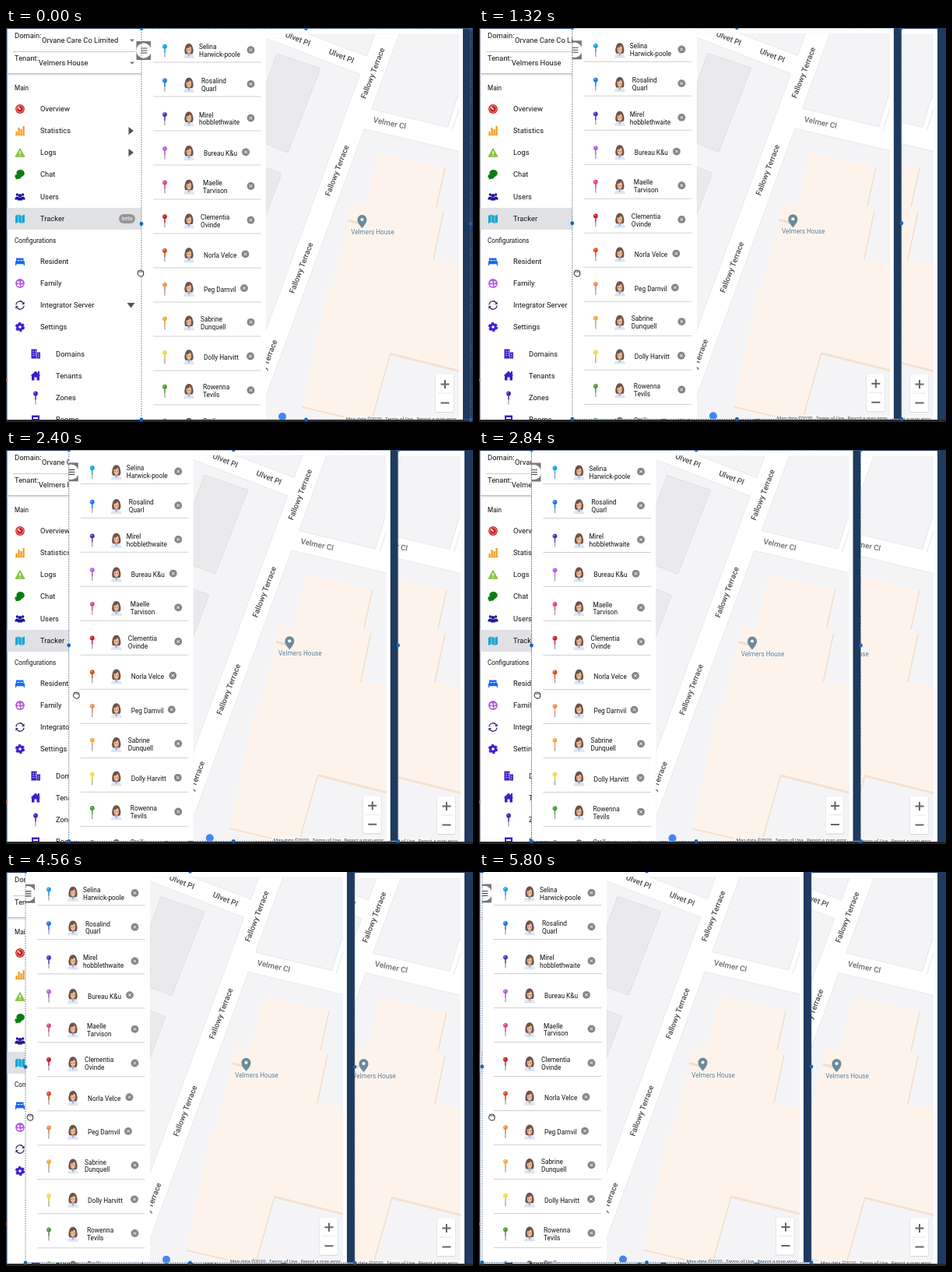
Recreate the animation shown at these times as an HTML page. Size 600x506 px, loop 5.84 s.

```html
<!DOCTYPE html>
<html lang="en">
<head>
<meta charset="utf-8">
<title>Sliding panel</title>
<style>
  html, body { margin: 0; width: 100%; height: 100%; overflow: hidden; background: #1f3a5f; }
  svg { display: block; width: 100vw; height: 100vh; font-family: Roboto, Arial, sans-serif; }
  .menu { font-size: 9.4px; fill: #111; }
  .head { font-size: 8.2px; fill: #111; }
  .row { font-size: 8.3px; fill: #111; }
  .road { font-size: 9.9px; font-weight: 500; fill: #4c4c4c; text-anchor: middle; }
</style>
</head>
<body>
<svg id="stage" viewBox="0 0 600 506" preserveAspectRatio="none"></svg>
<script>
const LOOP = 5840, STEP = 40, PANEL_X = 174, PANEL_W = 423;

// time, panel x, panel y shift, cursor x
const KEYS = [
  [0, 174, 0, 173], [800, 142, -.5, 142], [1840, 97.7, -1, 110], [2840, 67.5, -.5, 75],
  [3760, 52, -.3, 51], [4560, 25, -1.2, 31], [5800, 4, -1.5, 16.5]
];

const text = (x, y, s, cls, extra = '') => `<text x="${x}" y="${y}" class="${cls}" ${extra}>${s}</text>`;
const rect = (x, y, w, h, fill, extra = '') =>
  `<rect x="${x}" y="${y}" width="${w}" height="${h}" fill="${fill}" ${extra}/>`;
const circle = (x, y, r, fill, extra = '') => `<circle cx="${x}" cy="${y}" r="${r}" fill="${fill}" ${extra}/>`;
const path = (d, fill, extra = '') => `<path d="${d}" fill="${fill}" ${extra}/>`;
const line = (d, color, w = 1, extra = '') =>
  path(d, 'none', `stroke="${color}" stroke-width="${w}" ${extra}`);
const at = (x, y, body, turn = 0) => `<g transform="translate(${x} ${y}) rotate(${turn})">${body}</g>`;

const pin = color =>
  line('M0 -3V9', '#9a949f', 1.2) + line('M0 -3V3', color, 1.2) +
  circle(0, -5, 2.9, color) + circle(-.9, -5.9, .9, '#fff', 'opacity=".55"');

const icons = {
  gauge: circle(0, 0, 5.9, '#c8201e') + circle(0, 0, 4.3, 'none', 'stroke="#fff" stroke-width=".6"') +
    line('M-2.6 -2.4L.6 .8', '#fff', 1.5),
  bars: [[-5.5, 4], [-2.5, 9], [.5, 7], [3.5, 11]].map(([x, h]) => rect(x, 5 - h, 2.2, h, '#f39a1c')).join('') +
    rect(-6, 5, 12, 1, '#f39a1c'),
  warn: path('M0 -5.5L6 5.3H-6Z', '#8bc34a', 'stroke="#8bc34a" stroke-linejoin="round"') +
    line('M0 -2V2M0 3V4.2', '#fff', 1.3),
  chat: path('M1 -6A5 4.6 0 1 1 -2 2.4L-5 4L-4 1A5 4.6 0 0 1 1 -6Z', '#0a7d12') +
    path('M-5.5 0Q-8 3-5 5L-6 6.4L-2.5 5.8Q1 6 2 3.5Z', '#0a7d12'),
  users: [[-3.6, -1.6], [3.6, -1.6], [0, -.4]].map(([x, y], i) =>
    circle(x, y - 1.4, i > 1 ? 2.2 : 1.7, '#1d1596') +
    path(`M${x - 3} ${y + 5}Q${x - 3} ${y + 1} ${x} ${y + 1}T${x + 3} ${y + 5}Z`, '#1d1596')).join(''),
  map: path('M-6 -4L-2.4 -5.5V4.5L-6 6Z M-1.7 -5.5L1.7 -4V6L-1.7 4.5Z M2.4 -4L6 -5.5V4.5L2.4 6Z', '#12a5d8'),
  bed: path('M-5 -4.5H4.500V-.5H6V5H4.800V3.300H-4.800V5H-6V-.5H-5Z', '#1769f0') +
    line('M-3.500 -1.500H-.6M.6 -1.500H3.200', '#fff', 1),
  family: circle(0, 0, 5.9, '#b65be0') + circle(-2, -1.6, 1.5, '#fff') + circle(2.2, -1.6, 1.2, '#fff') +
    path('M-4.3 2.4Q-2 -.8 .3 2.4L-.6 4.4Z M1.2 2.6Q2.5 -.4 4.3 2L1.6 4Z', '#fff'),
  sync: line('M-5 -.5A5 5 0 0 1 4 -3.2M5 .5A5 5 0 0 1 -4 3.2', '#3a2566', 1.3) +
    path('M5.6 -4.8V-1H2Z M-5.6 4.8V1H-2Z', '#3a2566'),
  gear: circle(0, 0, 4.8, '#3a1fd6', 'stroke="#3a1fd6" stroke-width="2.6" stroke-dasharray="2.9 2.13"') +
    circle(0, 0, 1.8, '#fff'),
  building: rect(-5.5, -6, 7, 12, '#3a1fc8') + rect(2, -2, 4, 8, '#3a1fc8') +
    line('M-3 -4V4M0 -4V4M4 0V5', '#fff', 1, 'stroke-dasharray="1.4 1.3"'),
  house: path('M0 -6L6.5 0H5V6H1.5V2H-1.5V6H-5V0H-6.5Z M3 -5.5H5V-2H3Z', '#3a1fc8'),
  zone: pin('#3a1fc8'),
  room: rect(-5, -5, 10, 9, '#3a1fc8') + rect(-3, -2.5, 6, 2, '#fff')
};

const MENU = [
  [104, 'gauge', 'Overview'], [132, 'bars', 'Statistics'], [160, 'warn', 'Logs'], [188, 'chat', 'Chat'],
  [217, 'users', 'Users'], [245, 'map', 'Tracker'], [300, 'bed', 'Resident'], [328, 'family', 'Family'],
  [356, 'sync', 'Integrator Server'], [384, 'gear', 'Settings'],
  [418.5, 'building', 'Domains', 20], [446.5, 'house', 'Tenants', 20],
  [474.5, 'zone', 'Zones', 20], [502.5, 'room', 'Rooms', 20]
];

function menu() {
  const caret = (x, y) => path(`M${x - 3} ${y - 1.5}h6l-3 3.2Z`, '#777');
  const more = y => path(`M157.5 ${y - 5}l6.5 5l-6.5 5Z`, '#555');
  return rect(1.5, 1, 173, 502, '#fff') +
    text(11, 12.5, 'Domain:', 'menu') + text(46, 19, 'Orvane Care Co Limited', 'menu') +
    text(11, 41.5, 'Tenant:', 'menu') + text(42, 48, 'Velmers House', 'menu') +
    caret(162, 16) + caret(162, 45) +
    line('M9 30.5H166', '#ccc') + line('M1.5 58.8H174', '#bdbdbd', 1.4) + line('M1.5 60H174', '#e6e6e6', 1.4) +
    text(11, 80, 'Main', 'head') + text(11, 275.5, 'Configurations', 'head') +
    rect(1.5, 231, 173, 28, '#e0e1e4') +
    MENU.map(([y, icon, label, indent = 0]) =>
      at(18 + indent, y, icons[icon]) + text(44 + indent, y + 3.4, label, 'menu')).join('') +
    more(132) + more(160) + path('M155.5 353h10l-5 6.5Z', '#555') +
    rect(145, 239, 21, 12, '#969696', 'rx="6"') +
    text(155.5, 247.3, 'beta', '', 'font-size="6.8" fill="#fff" text-anchor="middle"');
}

// pin colour, text x, close x, lines
const PEOPLE = [
  ['#1ba0ea', 248, 314.5, 'Selina', 'Harwick-poole'], ['#1976f0', 251, 314.5, 'Rosalind', 'Quarl'],
  ['#4a2fc0', 248, 314.5, 'Mirel', 'hobblethwaite'], ['#b85ce0', 254, 308, 'Bureau K&amp;u'],
  ['#e0457b', 253, 314.5, 'Maelle', 'Tarvison'], ['#c81e1e', 250, 314.5, 'Clementia', 'Ovinde'],
  ['#e0491e', 254, 307.5, 'Norla Velce'], ['#f08c50', 254, 306, 'Peg Darnvil'],
  ['#f5a742', 250, 314.5, 'Sabrine', 'Dunquell'], ['#f5d94a', 254, 314, 'Dolly Harvitt'],
  ['#4d9a3a', 253, 314.5, 'Rowenna', 'Tevils'], ['#4d9a3a', 253, 314.5, 'Ottilie', 'Brandox']
];

const avatar =
  path('M-4.500 4.500Q-6.500 1-5 -3.500Q-4 -9 0 -9T5 -3.500Q6.500 1 4.500 4.500Z', '#705348') +
  path('M-7 10Q-7 4.500 0 4.500T7 10Z', '#dfe5ef') +
  path('M-2 4.300H2L0 8.500Z', '#8fb0d8') +
  path('M-3.200 -3Q0 -3 1.500 -5.500Q3.200 -4.500 3.200 -1Q3.200 3 0 4Q-3.200 3 -3.200 -1Z', '#edb995') +
  circle(-1.4, -.8, .5, '#4b332b') + circle(1.4, -.8, .5, '#4b332b');

function person([color, x, closeX, first, second], i) {
  const y = 28.7 + 43.7 * i;
  const label = second ? text(x, y - 1.5, first, 'row') + text(x, y + 8.3, second, 'row')
                       : text(x, y + 4, first, 'row');
  return at(204, y, pin(color)) + at(235, y + .3, avatar) + label +
    at(closeX, y - .5, circle(0, 0, 4.9, '#85858b') + line('M-1.7 -1.7L1.7 1.7M1.7 -1.7L-1.7 1.7', '#fff', 1)) +
    line(`M189 ${44 + 44 * i}H327.500`, '#cfcfcf');
}

function map() {
  const roads = [['M324 -4L470 52', 24], ['M500.500 -22L308 501', 28.5], ['M455 114.500L600 149', 26]];
  const railway = [[471, 58], [425, 183], [379, 308], [333, 433]];
  return `<g clip-path="url(#mapClip)">` + rect(334, 7, 249, 496, '#f4f4f6') +
    path('M348 33L404 52L362 160L334 149V72Z M334 179L354 187L334 240Z', '#eaeaec', 'stroke="#dfdfe1"') +
    path('M479 161L564 180L553 230L562 236L549 298L590 306V510H440L381 487L413 333L418 335L440 248L445 224L462 231Z', '#fdf3ea') +
    path('M494 418L590 442V510H469Z', '#f4f4f6') +
    line('M564 180L553 230M562 236L549 298M381 487L445 502M494 418L470 503', '#efdcc9', 1.4) +
    line('M440 247L455 251', '#f3dcc6', 3) + line('M494 418.500L590 442.500', '#f3e0cf', 3) +
    roads.map(([d, w]) => line(d, '#e4e5e8', w + 1.6)).join('') +
    path('M566 133L580 88H596V150Z', '#fff', 'stroke="#e4e5e8"') +
    roads.map(([d, w]) => line(d, '#fff', w)).join('') +
    line('M573 132L584 98', '#e4e5e8') +
    railway.map(([x, y]) => at(x, y, text(0, 3.5, 'Fallowy Terrace', 'road'), -69)).join('') +
    [[375, 14], [431, 36]].map(([x, y]) => at(x, y, text(0, 3.5, 'Ulvet Pl', 'road'), 22)).join('') +
    at(493, 122, text(0, 3.5, 'Velmer Cl', 'road', 'style="fill:#6c6c6c"'), 12) +
    path('M457.500 257Q451 250 451.500 246A6 6 0 0 1 463.500 246Q464 250 457.500 257Z', '#6a8a9d') +
    circle(457.5, 246, 2.1, '#fff') +
    text(471, 265, 'Velmers House', '', 'font-size="8.2" fill="#5d7386" text-anchor="middle" paint-order="stroke" stroke="#fff" stroke-width="1.5"') +
    rect(434, 498, 150, 6, '#f8f8f8', 'opacity=".8"') +
    text(437, 503.5, 'Map data ©2020 &#160; Terms of Use &#160; Report a map error', '', 'font-size="6.1" fill="#444"') +
    circle(355, 499, 5, '#4285f4') +
    rect(551.5, 445, 24, 49, '#d5d5d5', 'rx="2"') + rect(552, 445, 23, 48, '#fff', 'rx="1.500"') +
    line('M555 469H572', '#e6e6e6') +
    line('M558.500 457.500H569.500M564 452V463M558.500 481.500H569.500', '#666', 2) + '</g>';
}

const burger = rect(167.5, 17, 18.5, 24, '#777') + circle(177, 29, 9.7, '#fff') +
  line('M173.500 26H181.500M173.500 29H181.500M173.500 32H181.500', '#444', 1.2);

const handles = [[0, .5], [.5, .5], [1, .5], [0, 251.5], [1, 251.5], [0, 503], [.5, 503], [1, 503]]
  .map(([k, y]) => circle(PANEL_X + k * PANEL_W, y, 2.4, '#1766b8')).join('');
const frame = `M${PANEL_X} .5H${PANEL_X + PANEL_W}V503H${PANEL_X}Z`;

const stage = document.getElementById('stage');
stage.innerHTML = `<defs>
  <clipPath id="mapClip"><rect x="334" y="7.500" width="248" height="495.500"/></clipPath>
  <clipPath id="panelClip"><rect x="${PANEL_X}" y="0" width="${PANEL_W}" height="503"/></clipPath>
  <g id="page">${rect(174, 1, 413, 502, '#fff') + PEOPLE.map(person).join('') + map() + burger}</g>
  </defs>` +
  rect(0, 0, 600, 506, '#1f3a5f') +
  `<use href="#page" x="2"/>` + menu() + burger +
  rect(0, 503, 600, 3, '#242628') + rect(0, 450, 1.5, 4, '#b5673c') +
  `<g id="panel"><g clip-path="url(#panelClip)">${rect(174, 0, 423, 503, '#1f3a5f')}<use href="#page"/></g>` +
  line(frame, '#66788c', 1, 'stroke-dasharray="1.500 1.500"') + handles + '</g>' +
  `<g id="cursor">` +
  path('M-3.500 -1Q-3.500 -4-1.500 -3.500Q0 -4.500 1.200 -3.500Q3.500 -3.700 3.700 -1V1Q3.500 4 1.500 4H-1Q-2.500 3.500-4 .8Z',
    '#fff', 'stroke="#222" stroke-width="1"') +
  line('M-1.300 -2.800V-1M.4 -2.800V-1M2 -2.600V-1', '#222', .7) + '</g>';

const panel = document.getElementById('panel');
const cursor = document.getElementById('cursor');

function pose(t) {
  let i = 1;
  while (i < KEYS.length - 1 && t > KEYS[i][0]) i++;
  const a = KEYS[i - 1], b = KEYS[i];
  const k = Math.min(1, (t - a[0]) / (b[0] - a[0]));
  return a.map((v, n) => v + (b[n] - v) * k);
}

function draw(ms) {
  const [, x, dy, cx] = pose(Math.floor((ms % LOOP) / STEP) * STEP);
  panel.setAttribute('transform', `translate(${x - PANEL_X} ${dy})`);
  cursor.setAttribute('transform', `translate(${cx} 315)`);
}

const start = performance.now();
function tick() {
  draw(performance.now() - start);
  requestAnimationFrame(tick);
}
tick();
</script>
</body>
</html>
```
